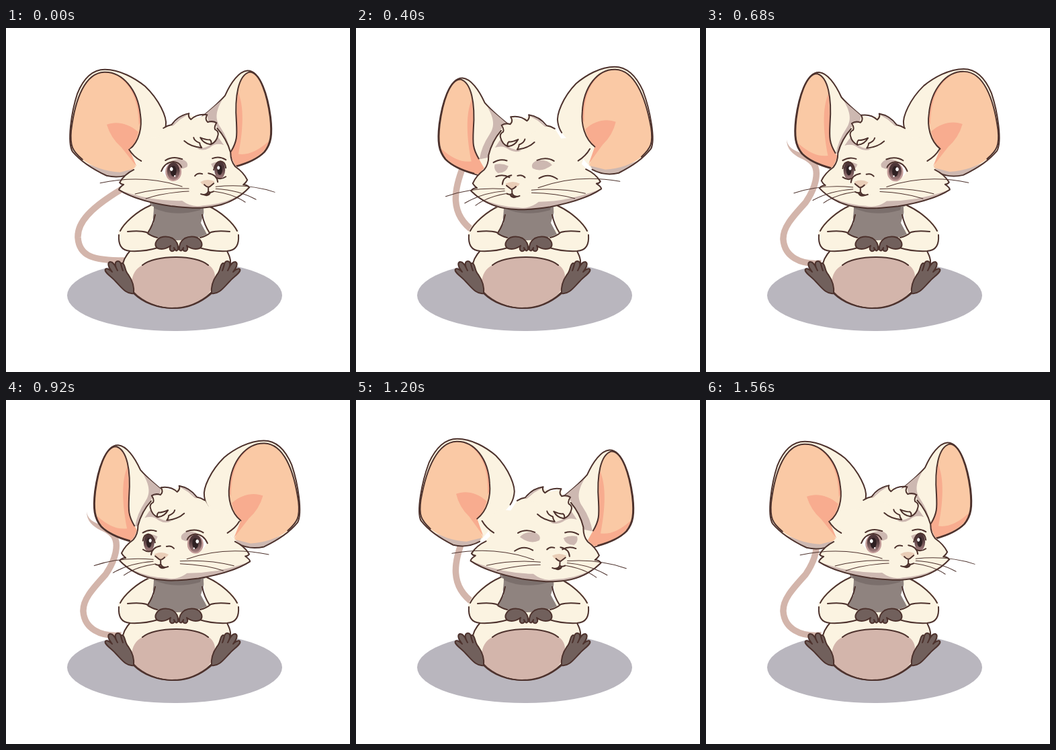
Write an HTML page that moves like this. It is 512 px wide and 512 px high and loops after 1600 ms.

```html
<!DOCTYPE html>
<html lang="en">
<head>
<meta charset="utf-8">
<title>Mouse looking around</title>
<style>
  html, body { margin: 0; width: 100%; height: 100%; overflow: hidden; background: #fff; }
  svg { display: block; width: 100%; height: 100%; fill: none; stroke-linecap: round; stroke-linejoin: round; }
  .line { stroke: #4d322d; stroke-width: 2; }
  .thin { stroke: #4d322d; stroke-width: 1; }
  .cream { fill: #fbf3e1; }
  .shade { fill: #cdb8b1; }
  .pink { fill: #d3b5ab; }
  .peach { fill: #fac9a5; }
  .coral { fill: #f8ac8f; }
  .paw { fill: #71605c; }
  .white { fill: #fff; }
  .pupil { fill: #2e2022; }
  .tail path { stroke: #d3b5ab; stroke-width: 9.5; stroke-linecap: butt; }
  .tail .tip { stroke: none; fill: #d3b5ab; }
</style>
</head>
<body>
<svg viewBox="0 0 512 512">
  <defs>
    <linearGradient id="iris" x2="0" y2="1">
      <stop offset=".35" stop-color="#4e3638"/><stop offset="1" stop-color="#a58080"/>
    </linearGradient>
    <path id="nearOutline" d="M190 215Q172 225 150 220Q116 204 99 184C91 170 97 126 106 98C116 73 130 62 147 62C169 62 192 75 207 87C228 107 240 133 238 145Q237 154 233 160"/>
    <g id="foot">
      <path class="paw line" d="M190 395C179 397 171 385 163 377C158 371 145 363 148 359C150 357 155 360 158 363C151 354 151 349 155 348C161 348 163 356 166 361C161 352 162 347 167 347C172 347 171 355 174 361C171 353 170 350 173 350C178 351 176 361 182 367C189 377 191 386 190 395Z"/>
    </g>
    <g id="arm">
      <path class="cream" d="M214 264C190 274 168 293 167 308C167 322 171 331 185 332Q207 333 226 327L224 313L210 307C217 295 220 280 220 266Z"/>
      <path class="line" d="M215 264C192 274 175 292 170 302M168 308C167 322 171 331 185 332Q207 333 226 327M181 303Q199 301 209 304Q216 310 225 312M222 278Q219 293 211 305"/>
      <path class="paw line" d="M223 319C227 309 240 309 248 313Q257 319 256 330Q253 334 250 327Q252 333 246 332Q242 330 245 324Q236 331 226 328Q221 325 223 319Z"/>
    </g>
  </defs>

  <ellipse cx="251" cy="398" rx="160" ry="53" fill="#b9b6be"/>

  <g class="tail">
    <path d="M172 240C125 268 106 290 107 312C109 340 130 346 176 346"/>
    <g>
      <path class="tip" d="M120 166C122 179 131 182 144 187Q156 192 163 199L156 204Q149 197 141 194C129 188 120 180 120 166Z"/>
      <path d="M158 199C171 213 162 240 148 260C127 283 114 298 115 315C117 340 140 353 172 350"/>
    </g>
    <path d="M160 205C146 240 138 277 176 303"/>
  </g>

  <path class="cream line" d="M186 330C177 340 171 352 175 362C180 395 215 417 250 417C290 417 325 385 334 352C335 344 332 338 328 330"/>
  <path class="pink" d="M203 353C222 337 285 337 302 353C315 362 313 380 304 392C280 424 220 424 190 392C184 375 189 360 203 353Z"/>
  <path class="line" d="M203 353C222 337 283 337 301 353M190 395C220 424 274 425 305 394"/>
  <path class="cream" d="M200 300H312V334H200Z"/>
  <path fill="#8f837f" d="M214 260H299L290 290L299 307Q280 316 255 316T210 308L220 290Z"/>
  <path fill="#7b6f6c" d="M217 258H292L289 271Q250 282 220 268Z"/>
  <use href="#foot"/>
  <use href="#foot" transform="matrix(-1 0 0 1 496 0)"/>
  <use href="#arm"/>
  <use href="#arm" transform="matrix(-1 0 0 1 514 0)"/>

  <g id="mouseHead">
    <g id="farEar">
      <path class="cream line" d="M280 140Q311 116 325 100C334 80 346 64 358 63C378 62 389 102 393 132C396 158 394 172 384 184Q370 198 341 206L312 214Z"/>
      <path class="shade" d="M281 140L321 106C312 122 309 134 318 147Q330 165 333 184L314 180Z"/>
      <path class="peach" d="M361 65C378 65 388 102 392 132C395 158 393 172 383 184Q370 197 341 205L320 208L334 183C343 168 343 160 342 140C339 100 345 70 361 65Z"/>
      <path class="coral" d="M344 94C354 116 352 152 345 187Q366 190 390 168Q386 190 341 205L320 208L334 183C343 168 343 160 342 140Z"/>
      <path class="line" d="M361 65C345 70 339 100 342 140C343 160 343 168 334 183M361 65C378 65 388 102 392 132C395 158 393 172 383 184Q370 197 341 205"/>
    </g>

    <g id="nearEar">
      <use href="#nearOutline" class="cream"/>
      <path class="cream" d="M233 160L202 197L190 180L205 90Z"/>
      <path class="shade" d="M112 198Q148 217 194 206L190 214Q172 224 150 219Q128 211 112 198Z"/>
      <path class="peach" d="M146 66C118 67 103 104 97 153C95 176 99 183 114 196Q137 213 170 215L194 209L184 181C199 169 203 147 200 129C196 92 173 65 146 66Z"/>
      <path class="coral" d="M150 144C163 139 181 141 197 155Q194 171 184 181L195 207Q185 194 172 178Q156 164 150 144Z"/>
      <path class="coral" d="M165 71C188 86 197 110 198 145L201 138C200 105 186 79 165 71Z"/>
      <path class="line" d="M114 196C99 183 95 176 97 153C103 104 118 67 146 66C173 65 196 92 200 129C203 147 199 169 184 181"/>
      <use href="#nearOutline" class="line"/>
    </g>

    <g id="face">
      <path class="cream" d="M225 164L234 149L246 144L271 129L310 143Q329 162 334 185Q336 196 341 204Q354 215 359 226L354 232L362 237Q344 257 320 264Q291 270 245 265Q193 257 168 241L175 233L169 230Q177 217 189 210L196 203Q190 186 183 181Q201 173 205 163Z"/>
      <path class="shade" d="M168 241Q215 258 262 257Q277 268 293 264Q337 261 362 237Q344 257 320 264Q291 270 245 265Q193 257 168 241Z"/>
      <path class="shade" d="M246 146Q258 131 271 127L273 136L251 145ZM284 179Q302 179 309 168L314 160L324 174Q312 170 303 178Q293 184 284 179Z"/>
      <path class="line" d="M183 181Q189 191 201 198M190 211Q176 218 169 230Q171 233 175 233Q168 238 168 241Q193 257 245 265Q281 269 296 267Q337 264 362 237Q359 233 353 233Q357 230 359 226Q354 215 341 206Q334 198 334 185Q328 164 314 149"/>
      <path class="cream" d="M248 146L259 136L272 128L275 136L299 129L301 140L313 142Q310 150 315 159Q314 168 305 173L289 163Z"/>
      <path class="line" d="M234 149Q240 145 246 144Q256 130 272 127Q270 132 275 136Q284 127 299 129Q295 136 300 140Q307 137 313 141Q309 147 311 151Q317 154 315 160Q313 169 305 173Q306 168 303 166Q299 167 289 163Q294 172 304 173M265 168Q275 177 291 178Q288 174 288 171Q280 168 279 163"/>

      <path class="shade" d="M240 203Q247 194 262 195Q273 200 269 207Q256 214 240 203ZM305 202Q314 197 325 199Q328 206 321 212Q308 212 305 202Z"/>
      <path class="line" d="M237 197Q248 190 262 195M307 194Q317 190 327 196"/>
      <g id="open">
        <path class="white" d="M232 213Q237 200 249 200L257 226Q239 228 232 213ZM309 213Q311 200 320 199L323 224Q312 225 309 213Z"/>
        <ellipse cx="249" cy="214" rx="12" ry="14" fill="#c29b98"/>
        <ellipse cx="249" cy="213" rx="9.5" ry="13" fill="url(#iris)"/>
        <ellipse cx="249" cy="213" rx="4.5" ry="8" class="pupil"/>
        <ellipse cx="318" cy="211" rx="8" ry="13" fill="url(#iris)"/>
        <ellipse cx="318" cy="211" rx="3.8" ry="7.5" class="pupil"/>
        <path class="white" d="M246 207a2.3 3 0 1 0 .1 0M316 205a2 2.8 0 1 0 .1 0M251 219a1 1.3 0 1 0 .1 0"/>
        <path class="line" d="M231 213Q236 200 249 199Q258 200 261 207M309 211Q311 199 319 198Q326 199 327 208M314 223Q320 226 327 221"/>
      </g>
      <path id="closed" class="line" d="M233 224Q246 214 260 222M304 219Q314 213 324 217"/>

      <path fill="#e9cdb7" d="M289 229Q299 223 310 228Q310 234 302 237Q294 236 289 229Z"/>
      <path class="line" d="M281 220Q285 215 292 217M301 216Q314 218 315 229M295 233Q300 238 303 236L309 231M301 237V243M290 247Q298 250 301 243Q303 246 309 243"/>
      <path class="line" fill="#6d3733" d="M294 248Q300 248 304 245Q301 251 294 248Z"/>
      <path class="thin" d="M140 231Q204 217 262 236M192 247Q230 237 272 239M208 254Q235 245 272 243M312 236Q360 231 400 244M312 239Q347 241 372 255M310 243Q339 247 356 259"/>
    </g>
  </g>
</svg>
<script>
  const LOOP = 1600, HALF = 800, STEP = 40, TURN = 400, LEAD = 20;
  const el = id => document.getElementById(id);
  const move = (id, transform) => el(id).setAttribute('transform', transform);
  const show = (node, on) => node.style.display = on ? '' : 'none';
  const tails = [...document.querySelector('.tail').children];

  function tailPose(t) {
    const u = t % HALF;
    if (u < 100) return 0;
    return u >= 300 && u < 500 ? 2 : 1;
  }

  function draw(t) {
    // turn is 0 at the end of each glance and 1 where the head flips sides
    const phase = (t + LEAD) % LOOP;
    const facingLeft = phase >= TURN && phase < TURN + HALF;
    const sinceFlip = (phase + TURN) % HALF;
    const turn = Math.abs(sinceFlip - TURN) / TURN;

    move('mouseHead', facingLeft ? `matrix(-1 0 0 1 ${530 + 6 * turn} 0)` : 'translate(0)');
    move('farEar', `translate(${20 * turn} ${12 * turn})`);
    move('nearEar', `matrix(${1 - .02 * turn} 0 ${-.06 * turn} 1 ${10.6 * turn} ${-4.5 * turn})`);
    move('face', `translate(${3 * turn} ${2 * turn}) rotate(${2.2 * turn} 265 230)`);

    const blink = turn > .8;
    show(el('open'), !blink);
    show(el('closed'), blink);
    tails.forEach((tail, i) => show(tail, i === tailPose(t)));
  }

  const start = performance.now();
  function tick() {
    const t = (performance.now() - start) % LOOP;
    draw(Math.floor(t / STEP) * STEP);
    requestAnimationFrame(tick);
  }
  tick();
</script>
</body>
</html>
```
